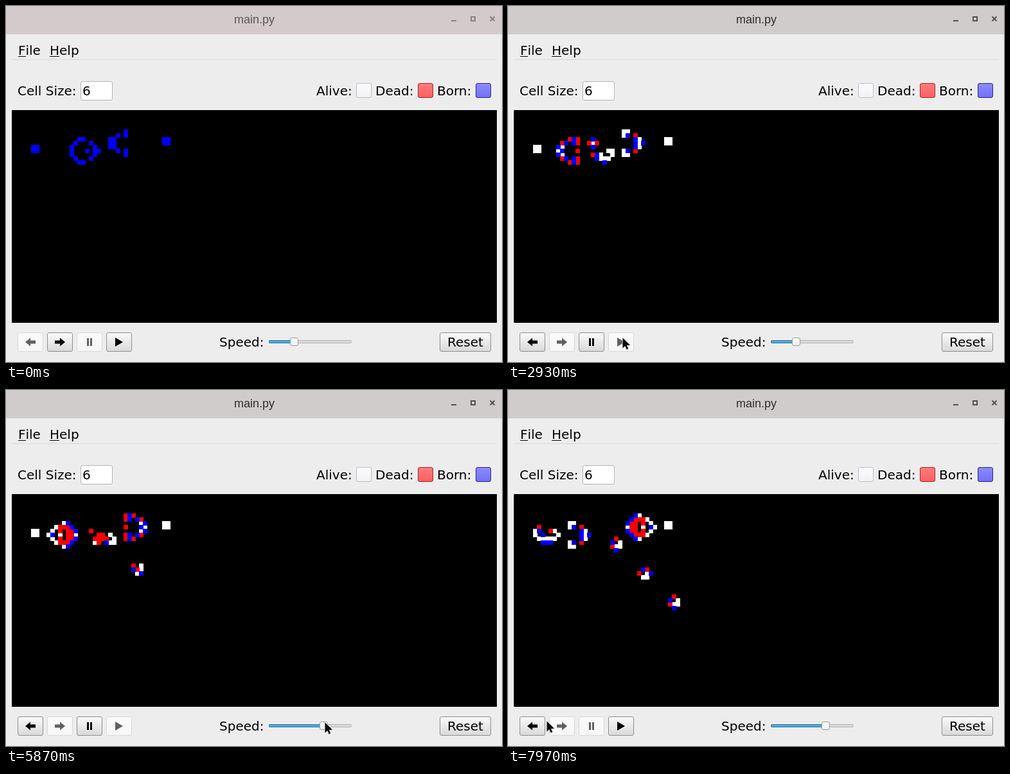
Recreate the animation shown at these times as an HTML page with a canvas. Size 772 by 554 pixels, loop 8000 ms.

```html
<!DOCTYPE html>
<html lang="en">
<head>
<meta charset="utf-8">
<title>Game of Life</title>
<style>
html, body { margin: 0; width: 100%; height: 100%; overflow: hidden; background: #ededed; }
canvas { display: block; }
</style>
</head>
<body>
<canvas id="stage" width="772" height="554"></canvas>
<script>
const ctx = document.getElementById('stage').getContext('2d');
const LOOP = 8000;
const PLAY_AT = 1780, DRAG_FROM = 4920, DRAG_TO = 5060, PAUSE_AT = 7550;
const SLIDER = { x: 409, slow: 448.5, fast: 494.5 };
const COLS = 126, ROWS = 55, CELL = 6, MARGIN = 5;
const BOARD = { x: 9, y: 162, w: 755, h: 331 };
const UI_FONT = '20px "DejaVu Sans", sans-serif';
const TITLE_FONT = '18px "Liberation Sans", Arial, sans-serif';
const GLIDER_GUN = '24bo$22bobo$12b2o6b2o12b2o$11bo3bo4b2o12b2o$2o8bo5bo3b2o$' +
  '2o8bo3bob2o4bobo$10bo5bo7bo$11bo3bo$12b2o';

const clamp01 = v => Math.min(1, Math.max(0, v));
const progress = (t, from, to) => clamp01((t - from) / (to - from));
const smooth = u => u * u * (3 - 2 * u);
const easeOut = u => 1 - (1 - u) ** 2;
const mix = (a, b, u) => a + (b - a) * u;

// The pointer rests between moves
const pointerHome = { x: 785, y: 380 };
const pointerMoves = [
  { from: 760, to: 1500, x: 178, y: 516, ease: smooth },
  { from: 3450, to: 4080, x: 474, y: 514, ease: smooth },
  { from: 4200, to: 4600, x: 449, y: 517, ease: smooth },
  { from: DRAG_FROM, to: DRAG_TO, x: 496, y: 517, ease: easeOut },
  { from: 5940, to: 6500, x: 131, y: 518, ease: smooth },
  { from: 7600, to: 7960, x: 60, y: 515, ease: smooth }
];

function pointerAt(t) {
  let { x, y } = pointerHome;
  for (const m of pointerMoves) {
    const u = m.ease(progress(t, m.from, m.to));
    x = mix(x, m.x, u);
    y = mix(y, m.y, u);
  }
  return { x: Math.round(x), y: Math.round(y) };
}

const sliderAt = t =>
  mix(SLIDER.slow, SLIDER.fast, easeOut(progress(t, DRAG_FROM, DRAG_TO)));

// Step length falls linearly with the slider's value
const stepTime = handle => 152 * (1 - (handle - SLIDER.x - 6.5) / 116);

// Each slider change restarts the timer, so no step happens during the drag
function generationAt(t) {
  const slow = Math.max(0, Math.min(t, DRAG_FROM) - PLAY_AT);
  const fast = Math.max(0, Math.min(t, PAUSE_AT) - DRAG_TO);
  return Math.floor(slow / stepTime(SLIDER.slow) + fast / stepTime(SLIDER.fast));
}

function parsePattern(rle) {
  const grid = new Uint8Array(COLS * ROWS);
  let x = MARGIN, y = MARGIN;
  for (const [, count, tag] of rle.matchAll(/(\d*)([bo$])/g)) {
    if (tag === '$') { x = MARGIN; y++; continue; }
    const run = Number(count || 1);
    if (tag === 'o') grid.fill(1, y * COLS + x, y * COLS + x + run);
    x += run;
  }
  return grid;
}

function nextGrid(grid) {
  const next = new Uint8Array(grid.length);
  for (let y = 1; y < ROWS - 1; y++) {
    for (let x = 1; x < COLS - 1; x++) {
      const i = y * COLS + x;
      let sum = 0;
      for (const d of [-COLS, 0, COLS]) sum += grid[i + d - 1] + grid[i + d] + grid[i + d + 1];
      next[i] = sum === 3 || (sum === 4 && grid[i]) ? 1 : 0;
    }
  }
  return next;
}

const grids = [parsePattern(GLIDER_GUN)];
while (grids.length <= generationAt(LOOP)) grids.push(nextGrid(grids[grids.length - 1]));

function rect(x, y, w, h, fill) {
  ctx.fillStyle = fill;
  ctx.fillRect(x, y, w, h);
}

function text(str, x, y, font = UI_FONT, fill = '#000', align = 'left') {
  ctx.font = font;
  ctx.fillStyle = fill;
  ctx.textAlign = align;
  ctx.fillText(str, x, y);
}

// Menu title with its first letter underlined
function menu(str, x) {
  text(str[0], x, 76);
  const w = ctx.measureText(str[0]).width;
  text(str.slice(1), x + w, 76);
  rect(x, 78, Math.round(w), 1, '#000');
}

// Rounded box with a vertical gradient and a 1px border
function box(x, y, w, h, top, bottom, border, r = 2.5) {
  const g = ctx.createLinearGradient(0, y, 0, y + h);
  g.addColorStop(0, top);
  g.addColorStop(1, bottom);
  ctx.beginPath();
  ctx.roundRect(x + 0.5, y + 0.5, w - 1, h - 1, r);
  ctx.fillStyle = g;
  ctx.fill();
  ctx.strokeStyle = border;
  ctx.lineWidth = 1;
  ctx.stroke();
}

function drawTitleBar(active) {
  const ink = active ? '#505050' : '#86807f';
  rect(0, 0, 772, 44, active ? '#d0cccc' : '#d4cacc');
  text('main.py', 386.5, 27, TITLE_FONT, active ? '#2c2c2c' : '#585858', 'center');
  rect(693, 22, 8, 2, ink);
  ctx.strokeStyle = ink;
  ctx.lineWidth = 2;
  ctx.strokeRect(724, 17, 6, 6);
  ctx.beginPath();
  for (const side of [-3.5, 3.5]) {
    ctx.moveTo(757 - side, 16.5);
    ctx.lineTo(757 + side, 23.5);
  }
  ctx.stroke();
}

function drawHeader() {
  menu('File', 19);
  menu('Help', 68);
  rect(9, 83, 755, 1, '#d8d8d8');
  text('Cell Size:', 18, 139);
  box(116, 117, 50, 30, '#fff', '#fff', '#b4b4b4');
  text('6', 119, 139);
  text('Alive:', 483, 139);
  box(545, 120, 24, 23, '#fcfcfe', '#f2f2f6', '#bcbcc4');
  text('Dead:', 575, 139);
  box(641, 120, 24, 23, '#ff7c7c', '#f86060', '#a02424');
  text('Born:', 671, 139);
  box(731, 120, 24, 23, '#8c8cff', '#7070f4', '#24248c');
}

function drawBoard(gen) {
  const now = grids[gen], before = gen ? grids[gen - 1] : new Uint8Array(now.length);
  const layers = [
    ['#fff', i => now[i] && before[i]],
    ['#f00', i => !now[i] && before[i]],
    ['#00f', i => now[i] && !before[i]]
  ];
  rect(BOARD.x, BOARD.y, BOARD.w, BOARD.h, '#000');
  for (const [fill, shows] of layers) {
    for (let i = 0; i < now.length; i++) {
      if (!shows(i)) continue;
      const x = BOARD.x + i % COLS * CELL, y = BOARD.y + Math.floor(i / COLS) * CELL;
      rect(x, y, CELL + 1, CELL + 1, fill);
    }
  }
}

function arrow(cx, dir, ink) {
  ctx.fillStyle = ink;
  ctx.beginPath();
  ctx.moveTo(cx + 8 * dir, 523);
  ctx.lineTo(cx, 516.5);
  ctx.lineTo(cx, 529.5);
  ctx.fill();
  rect(cx - 4 - 4 * dir, 520.5, 8, 5, ink);
}

const icons = {
  back: (cx, ink) => arrow(cx, -1, ink),
  next: (cx, ink) => arrow(cx, 1, ink),
  pause(cx, ink) {
    for (const dx of [-4, 1]) rect(cx + dx, 517, 3, 12, ink);
  },
  play(cx, ink) {
    ctx.fillStyle = ink;
    ctx.beginPath();
    ctx.moveTo(cx - 6, 516);
    ctx.lineTo(cx + 6, 523);
    ctx.lineTo(cx - 6, 530);
    ctx.fill();
  }
};

function button(x, w, on) {
  if (on) box(x, 508, w, 30, '#fbfbfb', '#d8d8da', '#8e8e8e');
  else box(x, 508, w, 30, '#fafafa', '#f6f6f6', '#d8d8d8');
}

function drawControls(t) {
  const started = t >= PLAY_AT, running = started && t < PAUSE_AT;
  const enabled = { back: started, next: !started, pause: running, play: !running };
  Object.keys(enabled).forEach((name, i) => {
    const x = 18 + 46 * i;
    button(x, 40, enabled[name]);
    icons[name](x + 20, enabled[name] ? '#000' : '#606060');
  });

  const handle = Math.round(sliderAt(t) - 0.5) + 0.5;
  text('Speed:', 332, 530);
  box(SLIDER.x, 520, 129, 5, '#d0d0d0', '#e4e4e4', '#b4b4b4', 1.5);
  box(SLIDER.x, 520, handle - SLIDER.x, 5, '#54a6d8', '#54a6d8', '#2f7eb0', 1.5);
  box(handle - 6.5, 516, 13, 13, '#fff', '#eee', '#9a9a9a');

  button(675, 80, true);
  text('Reset', 715, 530, UI_FONT, '#000', 'center');
}

function drawPointer({ x, y }) {
  ctx.save();
  ctx.translate(x + 0.5, y + 0.5);
  ctx.lineWidth = 1.6;
  ctx.lineJoin = 'round';
  ctx.strokeStyle = '#e4e4e4';
  ctx.fillStyle = '#0c0c0c';
  const outline = new Path2D('M0 0V16L3.7 12.6 6.2 18 8.8 16.8 6.4 11.6 11.5 11.3Z');
  ctx.stroke(outline);
  ctx.fill(outline);
  ctx.restore();
}

function draw(t) {
  rect(0, 0, 772, 554, '#ededed');
  drawTitleBar(t >= PLAY_AT);
  drawHeader();
  drawBoard(generationAt(t));
  drawControls(t);
  drawPointer(pointerAt(t));
}

const start = performance.now();
function tick() {
  draw((performance.now() - start) % LOOP);
  requestAnimationFrame(tick);
}
tick();
</script>
</body>
</html>
```
